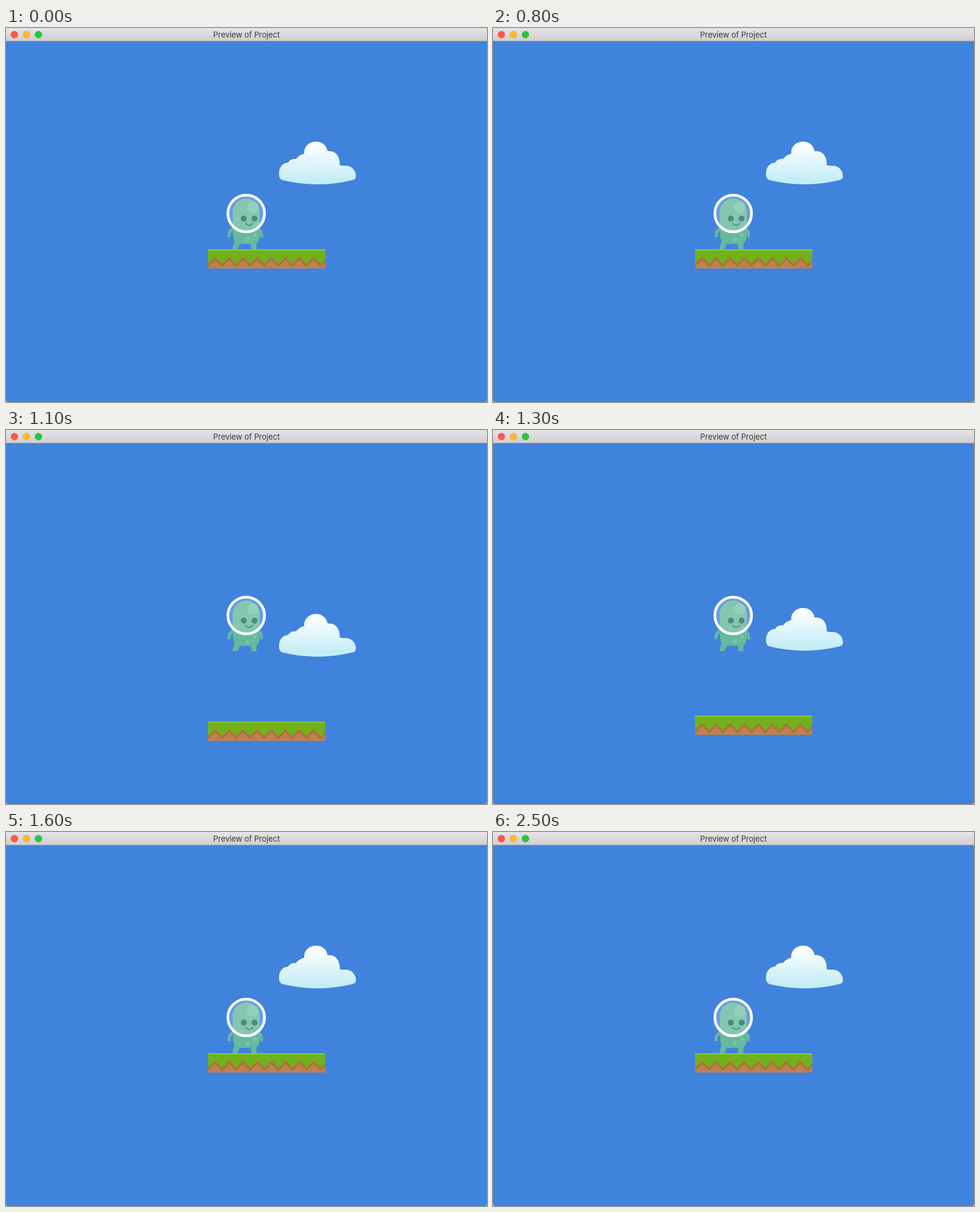
Write an HTML page that moves like this. It is 800 by 622 pixels and loops after 2.6 s.

```html
<!DOCTYPE html>
<html lang="en">
<head>
<meta charset="utf-8">
<title>Preview of Project</title>
<style>
  html, body { margin: 0; width: 100%; height: 100%; overflow: hidden; background: #fff; }
  svg { display: block; width: 800px; height: 622px; }
  text { font: 12.9px Inter, Roboto, sans-serif; fill: #3a3a3a; text-anchor: middle; }
</style>
</head>
<body>
<svg viewBox="0 0 800 622">
  <defs>
    <linearGradient id="bar" x2="0" y2="1">
      <stop stop-color="#e6e4e6"/><stop offset="1" stop-color="#cfcdcf"/>
    </linearGradient>
    <linearGradient id="vapor" x2="0" y2="1">
      <stop offset=".05" stop-color="#fff"/><stop offset=".9" stop-color="#c4edf6"/>
    </linearGradient>
    <clipPath id="window"><path d="M0 5Q0 0 5 0H795Q800 0 800 5V620L798 622H2L0 620Z"/></clipPath>
    <clipPath id="block"><path d="M336 368H531V400H336Z"/></clipPath>
  </defs>

  <g clip-path="url(#window)">
    <path fill="#4083dd" d="M0 0H800V622H0Z"/>

    <g id="world">
      <path fill="url(#vapor)" d="M460 253C455 251 454 247 454 242C454 231 461 224 469 224C472 219 477 217 482 218
        C486 213 491 210 496 209C495 197 504 189 515.5 189C526 189 533 195 535 205C547 203 556 213 555 228
        C558 229 562 229 565 229C575 229 582 237 582 246C582 250 580 252 576 253Q518 267 460 253Z"/>
      <g clip-path="url(#block)">
        <path fill="#72b01d" d="M336 368H531V400H336Z"/>
        <path fill="#86cc30" d="M336 368H531V370H336Z"/>
        <path id="soilEdge" fill="#ae7338"/>
        <path id="soil" fill="#bf8150"/>
      </g>
    </g>

    <g id="alien">
      <g fill="none" stroke="#65b99d" stroke-width="5">
        <path d="M379 334Q370 336 371 348M420 334Q426 338 425 348"/>
      </g>
      <path fill="#65b99d" d="M377 306A22.5 22.5 0 0 1 422 306V346Q421 356 416.5 358L416.5 368H408L407 359H389
        L385 368H376.5L380 354Q378 350 377.5 344Z"/>
      <g fill="#79c4aa">
        <circle cx="410.5" cy="298" r="9.5"/>
        <circle cx="402" cy="351.5" r="3.6"/>
        <circle cx="414.5" cy="344" r="3.2"/>
        <circle cx="411" cy="350.5" r="1.6"/>
      </g>
      <circle cx="399.5" cy="308.5" r="30.5" fill="#fff" fill-opacity=".2" stroke="#fff" stroke-width="4.5"/>
      <g fill="#4b8b7a">
        <circle cx="395.5" cy="317" r="5"/>
        <circle cx="413.5" cy="317" r="5"/>
      </g>
      <path d="M398 324.5Q404.5 332 411 324.5" fill="none" stroke="#4b8b7a" stroke-width="1.8"/>
    </g>

    <path fill="url(#bar)" d="M0 0H800V22H0Z"/>
    <path fill="#b3b1b4" d="M0 21H800V22H0Z"/>
    <g stroke-width=".6">
      <circle cx="14" cy="11" r="5.8" fill="#fc5650" stroke="#df4744"/>
      <circle cx="34" cy="11" r="5.8" fill="#fdb92d" stroke="#dea032"/>
      <circle cx="54" cy="11" r="5.8" fill="#28c63f" stroke="#27aa35"/>
    </g>
    <text x="400" y="16">Preview of Project</text>
  </g>
</svg>
<script>
  const byId = id => document.getElementById(id);

  function zigzag(peak, valley) {
    let path = 'M336 400';
    for (let i = 0; i <= 17; i++) path += `L${336 + i * 11.7} ${i % 2 ? peak : valley}`;
    return path + 'V400Z';
  }
  byId('soilEdge').setAttribute('d', zigzag(380.5, 392.5));
  byId('soil').setAttribute('d', zigzag(385.5, 398));

  // The camera follows the jumping alien, so the world drops by the jump height.
  const LOOP = 2600, STEP = 100, JUMP_START = 800;
  const jumpHeights = [0, 47, 93, 117, 123, 107, 72, 19];
  const start = performance.now();

  function draw() {
    const time = (performance.now() - start) % LOOP;
    const height = jumpHeights[Math.floor((time - JUMP_START) / STEP)] || 0;
    byId('world').setAttribute('transform', `translate(0 ${height})`);
    requestAnimationFrame(draw);
  }
  draw();
</script>
</body>
</html>
```
